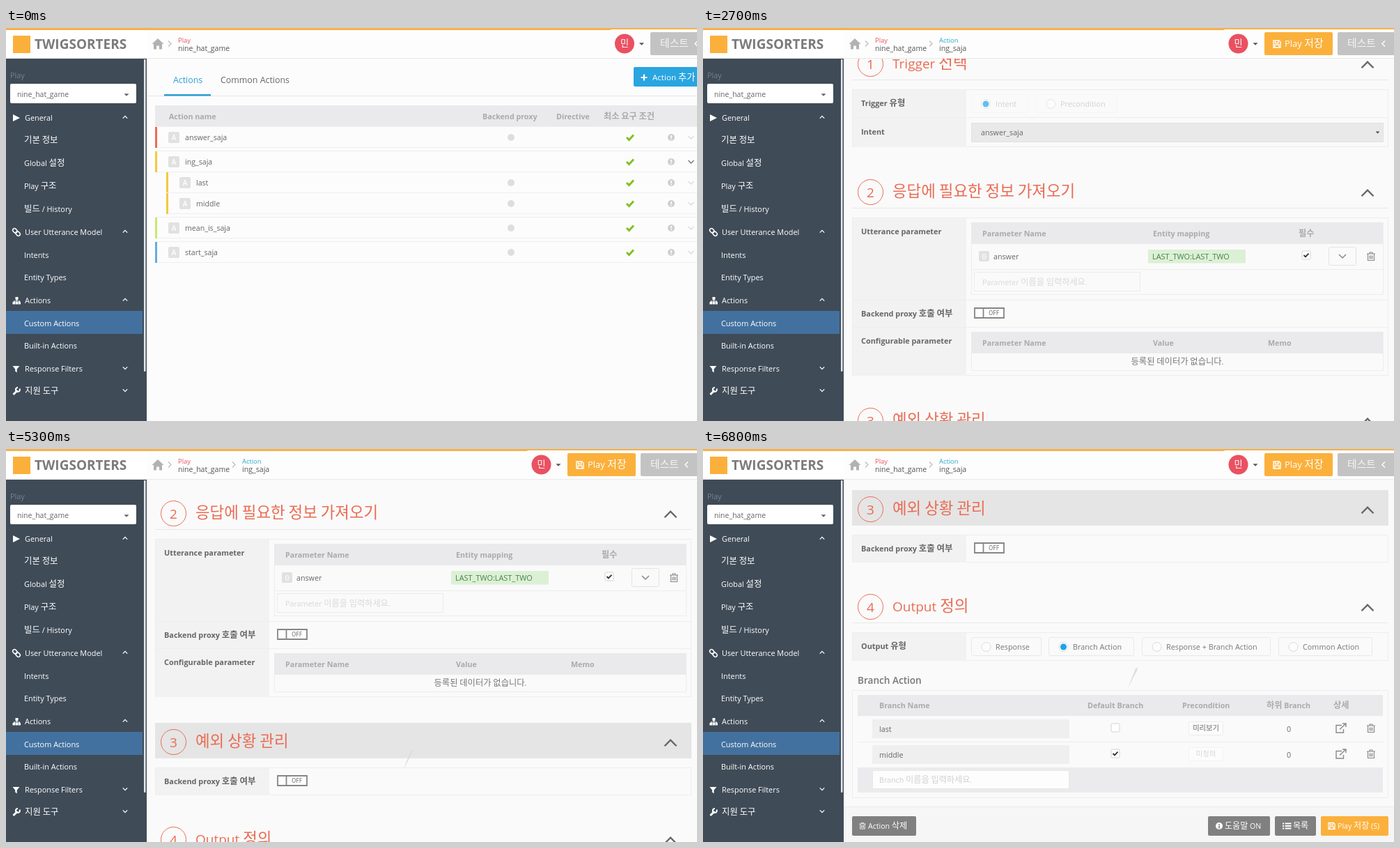
An HTML page that plays this animation: 992x564 px, repeating every 8000 ms.

```html
<!DOCTYPE html>
<html lang="ko">
<head>
<meta charset="utf-8">
<title>Action editor</title>
<style>
html, body { margin: 0; width: 100%; height: 100%; overflow: hidden; background: #fcfcfc; }
svg { display: block; width: 992px; height: 564px; font-family: "Open Sans", "Noto Sans CJK KR", "Noto Sans CJK", sans-serif; }
text { white-space: pre; }
.k { font-size: 1.14em; }
.title .k { font-size: 1.18em; font-weight: 300; }
.list, .detail, .scroll, .caret, .spell, .hover, .trail, .bar0, .bar1 { animation: 8s infinite both; }
.list { animation-name: list; }
.detail { animation-name: detail; }
.scroll { animation-name: scroll; }
.caret { animation-name: caret; animation-timing-function: step-end; }
.spell { animation-name: spell; animation-timing-function: step-end; }
.hover { animation-name: hover; animation-timing-function: step-end; }
.trail { animation-name: trail; }
.bar0 { animation-name: bar0; animation-timing-function: step-end; }
.bar1 { animation-name: bar1; animation-timing-function: step-end; }
@keyframes list {
  0% { opacity: 1; }
  5% { opacity: 1; animation-timing-function: steps(4, start); }
  11.25%, 100% { opacity: 0; }
}
@keyframes detail {
  0% { opacity: 0; }
  10% { opacity: 0; animation-timing-function: steps(5, end); }
  16.25%, 100% { opacity: 1; }
}
@keyframes scroll {
  0% { transform: translateY(0); }
  23.75% { transform: translateY(0); animation-timing-function: steps(8, end); }
  33.75% { transform: translateY(-138px); }
  46.25% { transform: translateY(-138px); animation-timing-function: steps(8, end); }
  56.25% { transform: translateY(-199px); }
  62.5% { transform: translateY(-199px); animation-timing-function: steps(3, end); }
  66.25% { transform: translateY(-281px); animation-timing-function: steps(4, end); }
  71.25% { transform: translateY(-430px); animation-timing-function: steps(2, end); }
  73.75% { transform: translateY(-475px); }
  78.75% { transform: translateY(-475px); animation-timing-function: steps(5, end); }
  85%, 100% { transform: translateY(-615px); }
}
@keyframes caret { 0% { opacity: 1; } 17.5% { opacity: 0; } 23.75%, 100% { opacity: 1; } }
@keyframes spell { 0% { opacity: 0; } 17.5%, 100% { opacity: 1; } }
@keyframes hover { 0% { opacity: 0; } 65%, 100% { opacity: 1; } }
@keyframes trail {
  0%, 64.9% { opacity: 0; transform: translate(577px, 446px); }
  65%, 66.25% { opacity: 1; transform: translate(577px, 446px); animation-timing-function: steps(4, end); }
  71.25%, 78.75% { opacity: 1; transform: translate(649px, 300px); animation-timing-function: steps(5, end); }
  85%, 100% { opacity: 1; transform: translate(617px, 328px); }
}
@keyframes bar0 { 0% { opacity: 1; } 10%, 100% { opacity: 0; } }
@keyframes bar1 { 0% { opacity: 0; } 10%, 100% { opacity: 1; } }
</style>
</head>
<body>
<script>
const RED = '#ea6b52', ORANGE = '#fbb03b', INK = '#666', HEAD = '#aaa', LINE = '#ededee', PAGE = '#fafafa';

const rect = (x, y, w, h, fill, stroke, r = 0) => stroke
  ? `<rect x="${x + .5}" y="${y + .5}" width="${w - 1}" height="${h - 1}" rx="${r}" fill="${fill}" stroke="${stroke}"/>`
  : `<rect x="${x}" y="${y}" width="${w}" height="${h}" rx="${r}" fill="${fill}"/>`;
const path = (d, stroke, w = 1.5, fill = 'none') =>
  `<path d="${d}" fill="${fill}" stroke="${stroke}" stroke-width="${w}"/>`;
const circle = (x, y, r, fill, stroke = 'none', w = 1) =>
  `<circle cx="${x}" cy="${y}" r="${r}" fill="${fill}" stroke="${stroke}" stroke-width="${w}"/>`;
const group = (name, ...parts) => `<g class="${name}">${parts.join('')}</g>`;
const at = (x, y, body) => `<g transform="translate(${x} ${y})">${body}</g>`;

// y is the optical middle of the line; Hangul is set slightly larger
const text = (x, y, s, size = 10.7, fill = INK, weight = 400, anchor = 'start') =>
  `<text x="${x}" y="${y + size * .36}" font-size="${size}" fill="${fill}" font-weight="${weight}" text-anchor="${anchor}">${
    s.replace(/[가-힣]+/g, '<tspan class="k">$&</tspan>')}</text>`;
const bold = (x, y, s) => text(x, y, s, 10.7, HEAD, 700);
const label = (x, y, s) => text(x, y, s, 10.9, '#666', 700);
const mid = (x, y, s, size, fill, weight) => text(x, y, s, size, fill, weight, 'middle');

const chevron = (x, y, r, dir, color, w = 1.5) =>
  path(`M${x - r} ${y - dir * r / 2}l${r} ${dir * r}l${r} ${-dir * r}`, color, w);
const tri = (x, y, r, color) => path(`M${x - r} ${y - r / 2}h${2 * r}l${-r} ${r}z`, 'none', 0, color);
const tick = (x, y, s, color, w) => path(`M${x - s} ${y}l${s * .7} ${s * .7}l${s * 1.3} ${-s * 1.4}`, color, w);
const trash = (x, y, c = '#888') => at(x, y,
  path('M-6 -4h12M-2 -4v-2h4v2M-4.5 -4v9.5h9v-9.5M-2 -1.5v5M0 -1.5v5M2 -1.5v5', c, 1.1));
const floppy = (x, y, s) => `<g transform="translate(${x} ${y}) scale(${s})">` +
  path('M-5 -5h8l2 2v8h-10zM-2.5 -5v3.5h4.5v-3.5M-3 5v-4h6v4', '#fff', 1.4) + '</g>';
const external = (x, y) => at(x, y,
  path('M1 -4.5h-8v10.5h10.5v-5M-2 1.5l8.5 -8M2 -7h5v5', '#888', 1.4));
const letterBox = (x, y, s, ch = 'A') =>
  rect(x, y, s, s, '#e1e1e2', null, 2) + mid(x + s / 2, y + s / 2, ch, s * .62, '#fff', 600);
const radio = (x, y, on, faint) => circle(x, y, 6.5, '#fcfcfc', faint ? '#e8e8e8' : '#dcdcdc') +
  (on ? circle(x, y, 4.5, faint ? '#62c0ee' : '#1ba4e4') : '');
const checkbox = (x, y, on) => rect(x - 6.5, y - 6.5, 13, 13, '#fff', '#d2d2d2', 1.5) +
  (on ? tick(x, y, 3.5, '#333', 1.8) : '');
const toggle = y => path(`M390 ${y - 7}h42v14h-42zM402.5 ${y - 7}v14`, '#858585', 1.8, '#fff') +
  mid(417.5, y, 'OFF', 8.2, '#888', 600);

const heading = (y, n, title) => path(`M214 ${y + 23.5}h770`, '#e7e7e8', 1) +
  circle(240.5, y + .5, 18, 'none', RED, 1) + mid(240.5, y + 1, n, 19, RED) +
  group('title', text(272, y, title, 19, RED)) + chevron(954, y + 2, 8.5, -1, '#666', 2.4);
const field = (y, h, name, ly) => rect(214, y, 770, h, PAGE, LINE) +
  rect(215, y + 1, 163, h - 1, '#f2f2f3') + label(227, ly, name);
const headRow = (x, y, w, h, cols) => rect(x, y, w, h, '#eaeaec') +
  cols.map(([cx, s]) => bold(cx, y + h / 2 + .5, s)).join('');

// Sidebar
const menu = [
  ['General', 129, -1], ['기본 정보', 161], ['Global 설정', 194], ['Play 구조', 227], ['빌드 / History', 260],
  ['User Utterance Model', 293, -1], ['Intents', 326], ['Entity Types', 358],
  ['Actions', 391, -1], ['Custom Actions', 424], ['Built-in Actions', 456],
  ['Response Filters', 489, 1], ['지원 도구', 521, 1]
];
const link = [-6.5, -.5].map(x =>
  `<rect x="${x}" y="-2.5" width="7" height="5" rx="2.5" fill="none" stroke="#fff" stroke-width="1.5"/>`).join('');
const icons = path('M10 124l10 5l-10 5z', 'none', 0, '#fff') +
  at(15, 293, `<g transform="rotate(45)">${link}</g>`) +
  path('M15.5 388v4M11.5 394v-2h8v2', '#fff', 1.2) + rect(13.5, 386, 4, 4, '#fff') +
  [10, 14, 18].map(x => rect(x - .5, 393, 3.5, 3.5, '#fff')).join('') +
  path('M9.5 485h10l-3.8 4.5v5l-2.5 -2v-3z', 'none', 0, '#fff') +
  path('M10.5 526l6 -6', '#fff', 3) + path('M19.5 517.5a3 3 0 1 1 -2.5 -1.5', '#fff', 2);
const sidebar = rect(0, 44, 202, 520, '#3f4b57') + rect(0, 406, 196, 33, '#43719f') +
  rect(198, 45, 2.5, 448, '#e4e7ea', null, 1) +
  text(6, 68, 'Play', 10.9, '#77828d') + rect(6, 80, 181, 28, '#fff', null, 2) +
  text(16, 95, 'nine_hat_game', 10.5, '#666') + tri(173, 96, 3.5, '#666') + icons +
  menu.map(([s, y, dir]) => text(dir ? 27 : 26, y, s, 10.9, '#fff') +
    (dir ? chevron(171, y - 1, 3.2, dir, '#fff', 1.3) : '')).join('');

// Header; the user area overlaps the lower edge of the orange line
const user = x => rect(x - 20, 2, 1012 - x, 40, '#fdfdfd') + circle(x, 22.5, 14, '#ea5161') +
  mid(x, 22.5, '민', 11.5, '#fff') + tri(x + 24.5, 23, 3.5, '#555');
const testButton = x => rect(x, 6, 90, 33, '#c3c3c3', null, 2) + text(x + 14, 22.5, '테스트', 13, '#f4f4f4') +
  path(`M${x + 68} 18.5l-4 4l4 4`, '#fff', 1.4);
const header = rect(202, 0, 790, 44, '#fdfdfd') + rect(0, 0, 202, 44, '#fff') +
  rect(0, 43, 992, 1, '#e9e9ea') + rect(0, 0, 992, 3, '#f6b14d') +
  rect(10, 11, 25, 25, ORANGE) + text(41, 23, 'TWIGSORTERS', 19, '#7b7b7b', 700) +
  path('M209.5 23l8.5 -8l8.5 8h-2.5v7.5h-4v-5h-4v5h-4v-7.5z', 'none', 0, '#b2b2b2') +
  path('M233 18.5l4 4l-4 4', '#bbb', 1.2) +
  text(247, 17.5, 'Play', 9.4, '#ea5161') + text(247, 29.5, 'nine_hat_game', 10.5, '#555') +
  group('bar0', user(888), testButton(925)) +
  group('bar1', path('M325 18.5l4 4l-4 4', '#bbb', 1.2), text(339, 17.5, 'Action', 9.4, '#27a9c9'),
    text(339, 29.5, 'ing_saja', 10.6, '#555'), user(768.5),
    rect(806, 6, 98, 33, ORANGE, null, 2), floppy(824, 23, 1), text(835, 22.5, 'Play 저장', 13, '#fff'),
    testButton(911));

// Action list
const rows = [
  ['answer_saja', 157, '#ef6b52'], ['ing_saja', 192, '#f6c93c'], ['last', 222, '#f6c93c', 16],
  ['middle', 252, '#f6c93c', 16], ['mean_is_saja', 287, '#c5ea6a'], ['start_saja', 322, '#68abde']
];
const row = ([name, y, color, dx = 0]) => {
  const open = name === 'ing_saja';
  return path(`M${214 + dx} ${y + 14.5}H992M${214 + dx} ${y - 15.5}H992`, '#efeff0', 1) +
    rect(214 + dx, y - 15, 3, 30, color) + letterBox(233 + dx, y - 8, 16) +
    text(257 + dx, y + .5, name, 10.6) + (open ? '' : circle(725, y, 5, '#dedede')) +
    tick(896, y, 5, '#86bf25', 3) + circle(955, y, 5, '#cfcfcf') +
    rect(954.2, y - 3, 1.6, 3.8, '#fff') + rect(954.2, y + 1.8, 1.6, 1.5, '#fff') +
    chevron(983.5, y, 4, 1, open ? '#777' : '#dcdcdc', 1.4);
};
const list = rect(202, 44, 790, 520, '#fcfcfd') + path('M202 97.5H992', '#e7e7e8', 1) +
  rect(227, 95, 67, 2.5, '#2c9dd4') + text(240, 75, 'Actions', 12.4, '#2c9dd4') +
  text(308, 75, 'Common Actions', 12.4) +
  rect(901, 56, 100, 28, '#29a5e0', null, 2) + path('M911.5 71h9M916 66.5v9', '#fff', 2.2) +
  text(928, 71, 'Action 추가', 11.6, '#fff') +
  headRow(214, 111, 778, 31, [[234, 'Action name'], [684, 'Backend proxy'], [790, 'Directive'], [858, '최소 요구 조건']]) +
  rows.map(row).join('');

// Action editor, laid out at scroll position zero
const badge = (x, s, fill) => rect(x, 63, 49, 14, fill, null, 2) + mid(x + 24.5, 70, s, 8.8, '#fff');
const intro = badge(219, 'Custom', '#ef9a72') + badge(275, 'Root', '#abd07f') +
  letterBox(220, 93, 25) + text(251, 104.5, 'ing_saja', 26.7, '#555') + rect(219, 125, 372, 1, '#8fb0c4') +
  group('spell', path('M251 118' + 'l2 -2l2 2'.repeat(24), '#e64b4b', 1)) +
  group('caret', rect(350.5, 84, 1, 38, '#333')) +
  label(608, 69, 'Memo') + rect(607, 81, 373, 44, '#f8f8f9', '#e6e6e7') + path('M202 134.5H992', '#ececed', 1);

const trigger = heading(189, '1', 'Trigger 선택') +
  field(226, 41, 'Trigger 유형', 246) + field(266, 43, 'Intent', 287) +
  rect(385, 233, 82, 27, PAGE, '#f5f5f5', 2) + radio(406, 247, true, true) + text(420, 247, 'Intent', 10.9, '#d2d2d2') +
  rect(478, 233, 117, 27, PAGE, '#f5f5f5', 2) + radio(499.5, 247, false, true) + text(513, 247, 'Precondition', 10.9, '#d2d2d2') +
  rect(385, 274, 592, 28, '#e9e9e9', '#e2e2e2') + text(399, 288.5, 'answer_saja', 10.7) + tri(968.5, 288, 2.8, '#444');

const info = heading(373, '2', '응답에 필요한 정보 가져오기') +
  field(410, 119, 'Utterance parameter', 430) + field(528, 40, 'Backend proxy 호출 여부', 548) +
  field(567, 70, 'Configurable parameter', 587) +
  rect(385, 417, 592, 104, PAGE, LINE) +
  headRow(385, 417, 591, 31, [[401, 'Parameter Name'], [646, 'Entity mapping'], [855, '필수']]) +
  path('M386 484.5h590', LINE, 1) + letterBox(396, 458, 15, '{}') + text(417, 466.5, 'answer', 10.7) +
  rect(639, 456, 140, 19.5, '#dcf0d5', null, 1) + text(645, 466.5, 'LAST_TWO:LAST_TWO', 10.9, '#47824a') +
  checkbox(866, 464, true) + rect(898, 452, 40, 27, PAGE, '#e4e4e4', 2) + chevron(918, 465.5, 5, 1, '#888') +
  trash(959, 466) + rect(389, 488, 239, 28, PAGE, '#ececed') +
  text(401, 503, 'Parameter 이름을 입력하세요.', 10.7, '#d8d8da') + toggle(547) +
  rect(385, 574, 592, 56, PAGE, LINE) +
  headRow(385, 574, 591, 31, [[401, 'Parameter Name'], [646, 'Value'], [811, 'Memo']]) +
  mid(681, 617, '등록된 데이터가 없습니다.', 10.8, '#777');

const errors = group('hover', rect(214, 674, 770, 51, '#e5e5e5')) + heading(701, '3', '예외 상황 관리') +
  field(738, 40, 'Backend proxy 호출 여부', 758) + toggle(757);

const outputs = [[385, 101, 'Response'], [496, 123, 'Branch Action', true], [630, 185, 'Response + Branch Action'], [826, 135, 'Common Action']];
const branch = (name, y, on) => rect(243, y - 13, 283, 27, '#efefef') + text(253, y + 1, name, 10.7) +
  checkbox(592, y - 1, on) + rect(697, y - 10, 50, 20, '#fcfcfc', on ? '#f3f3f3' : '#ececec', 2) +
  mid(722, y, on ? '미정의' : '미리보기', 9, on ? '#d6d6d6' : '#666') + mid(841, y + 1, '0', 10.7, INK) +
  external(916, y) + trash(959, y) + path(`M222 ${y + 19.5}h754`, LINE, 1);
const output = heading(841, '4', 'Output 정의') + field(878, 41, 'Output 유형', 898.5) +
  outputs.map(([x, w, s, on]) => rect(x, 885, w, 27, PAGE, '#e9e9ea', 2) +
    radio(x + 21.5, 899, on) + text(x + 35, 899, s, 10.8, '#777')).join('') +
  text(222, 947, 'Branch Action', 13.6, '#777', 600) + rect(214, 961, 770, 155, PAGE, LINE) +
  headRow(222, 968, 754, 30, [[253, 'Branch Name'], [552, 'Default Branch'], [688, 'Precondition'], [809, '하위 Branch'], [905, '상세']]) +
  branch('last', 1016, false) + branch('middle', 1053, true) +
  rect(222, 1072, 754, 36, '#ebebed') + rect(243, 1076, 283, 27, '#fdfdfd', '#e8e8e9') +
  text(253, 1090, 'Branch 이름을 입력하세요.', 10.7, '#d0d0d2');

const button = (x, w, tx, s, fill = '#808080') => rect(x, 1142, w, 28, fill, null, 2) + text(tx, 1156.5, s, 10.6, '#fff');
const footer = rect(202, 1128, 790, 60, '#f6f6f7') + path('M202 1128.5H992', '#ececed', 1) +
  button(214, 92, 237, 'Action 삭제') + `<g transform="translate(229 1156) scale(.75)">${trash(0, 0, '#fff')}</g>` +
  button(725, 89, 749, '도움말 ON') + circle(741, 1156, 5, '#fff') + rect(740.2, 1153, 1.6, 1.6, '#777') + rect(740.2, 1155.5, 1.6, 4, '#777') +
  button(821, 59, 847, '목록') + path([1152.5, 1156, 1159.5].map(y => `M832 ${y}h2M835.5 ${y}h9`).join(''), '#fff', 2) +
  button(887, 97, 911, 'Play 저장 (S)', ORANGE) + floppy(902.5, 1156, .9);

const detail = rect(202, 44, 790, 520, PAGE) +
  group('scroll', rect(202, 44, 790, 90, '#fcfcfc'), intro, trigger, info, errors, output, footer) +
  group('trail', path('M-7 15L4 -13L7 -15L6 -10Z', 'none', 0, '#dedede'));

document.body.innerHTML = '<svg viewBox="0 0 992 564">' + rect(202, 44, 790, 520, '#fcfcfd') +
  group('list', list) + group('detail', detail) + header + sidebar + '</svg>';
</script>
</body>
</html>
```
